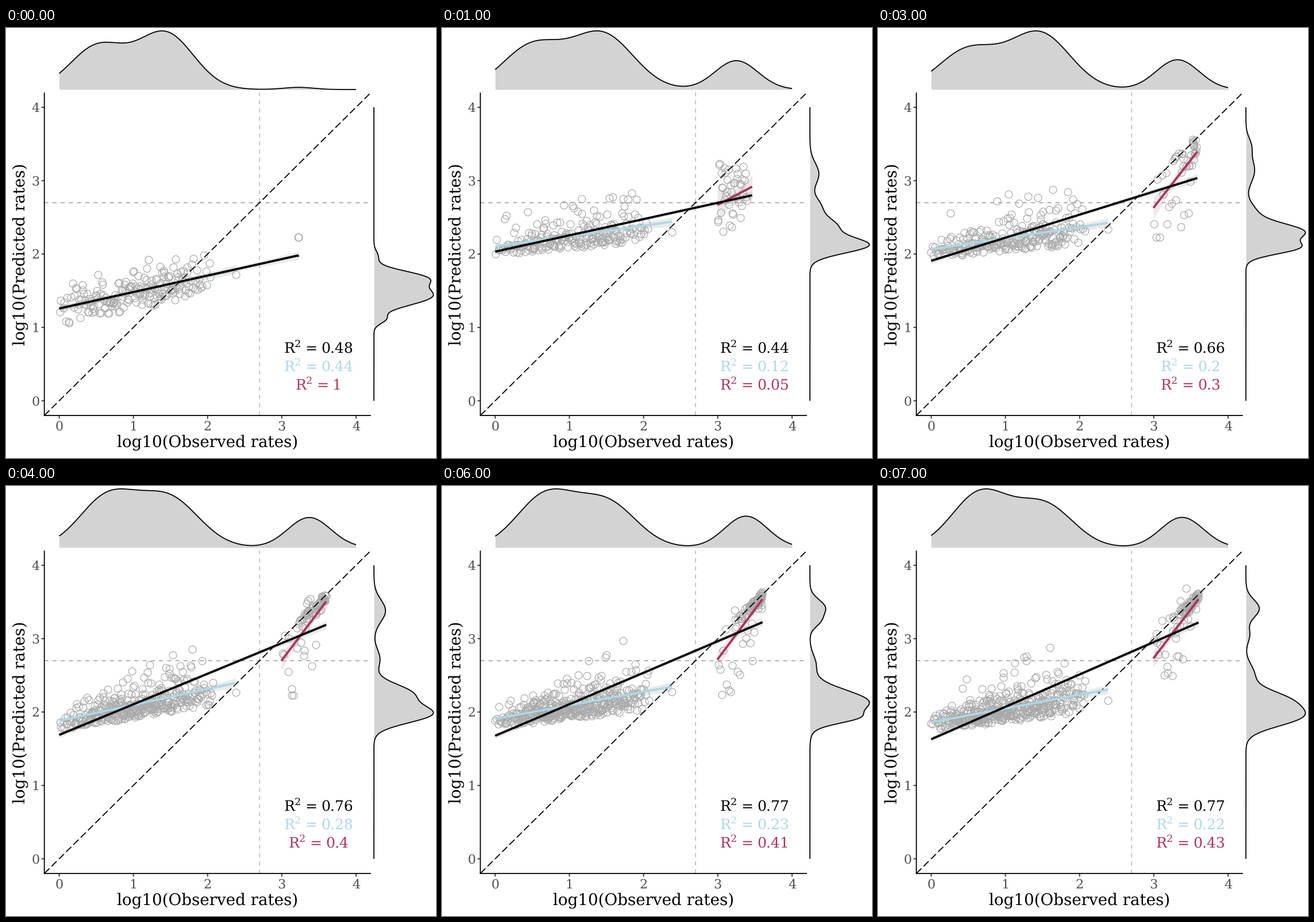
These frames come from a looping animation (748x748 px, 8 s). A matplotlib script:

```python
import numpy as np
import matplotlib.pyplot as plt
from matplotlib.animation import ArtistAnimation

SIZE, PT = 748, 0.72  # stage in pixels, points per pixel
GRAY, BLUE, RED = "#a9a9a9", "#add8e6", "#b03060"


def px(v):
    return 92.5 + 129.1 * v


def py(v):
    return 648.5 - 127.65 * v


LEFT, RIGHT, TOP, BOTTOM = px(-0.2), px(4.2), py(4.2), py(-0.2)
V = np.linspace(0, 4, 400)  # data values along both density panels

plt.rcParams["font.family"] = "DejaVu Serif"
plt.rcParams["text.hinting"] = "none"
fig = plt.figure(figsize=(SIZE / 100, SIZE / 100), dpi=100, facecolor="white")
ax = fig.add_axes([0, 0, 1, 1])
ax.set(xlim=(0, SIZE), ylim=(SIZE, 0))
ax.axis("off")


def line(xs, ys, color, width, z, **kw):
    return ax.plot(xs, ys, color=color, lw=width * PT, zorder=z, snap=False,
                   solid_capstyle="butt", **kw)[0]


def text(x, y, s, size, color="black", **kw):
    return ax.text(x, y, s, fontsize=size, color=color, zorder=9,
                   va="baseline", **kw)


def bumps(parts):
    """Sum of bell curves given as (centre, width, height)."""
    return sum(h * np.exp(-0.5 * ((V - c) / w) ** 2) for c, w, h in parts)


def left_cloud(rng, top, blue, n, shape, s0, s1):
    """x follows the first two bumps, y a skewed spread about the blue fit."""
    cdf = np.cumsum(bumps(top[:2]) * (V < 2.1))
    x = px(np.interp((np.arange(n) + rng.random(n)) / n, cdf / cdf[-1], V))
    x[-1] = blue[2]
    t = (x - px(0)) / 256
    tail = np.minimum(rng.gamma(shape, size=n), shape + 4.5 * shape ** 0.5)
    y = np.interp(x, blue[::2], blue[1::2])
    return np.c_[x, y + (s0 + (s1 - s0) * t) * (shape - tail)]


def right_cloud(rng, red, hug, gap, n, up, down):
    """Some points hug the diagonal, others scatter about the red fit."""
    x0, y0, x1, y1 = red
    end = (x1 - px(0)) / 129.1
    hx = 3.18 + (end - 3.18) * np.sqrt(rng.random(hug))
    hy = hx + 0.04 - gap * np.abs(rng.normal(size=hug))
    t = 0.85 * (np.arange(n) + rng.random(n)) / max(n, 1)
    y = y0 + (y1 - y0) * t + rng.uniform(-up, down, n)
    return np.vstack([np.c_[px(hx), py(hy)],
                      np.c_[x0 + (x1 - x0) * t, np.minimum(y, 364)]])


def state(top, side, end, black, blue, red, band, r2, left, right):
    """Densities, fits and points of one model."""
    rng = np.random.default_rng(left[0])
    black = (px(0), black[0], end, black[1])
    blue = (px(0), blue[0], px(2.38), blue[1])
    red = (red[0], red[1], end, red[2])
    pts = np.vstack([left_cloud(rng, top, blue, *left),
                     right_cloud(rng, red, *right)])
    top, side = bumps(top), bumps(side)
    return dict(top=top * 102 / top.max(), side=side * 103.5 / side.max(),
                fits=np.array([black, blue, red]), band=band, pts=pts, r2=r2)


def blend(a, b, r2):
    mid = {k: (a[k] + b[k]) / 2 for k in ("top", "side", "fits", "band")}
    return dict(mid, pts=np.vstack([a["pts"][::2], b["pts"][1::2]]), r2=r2)


first = state(
    [(.52, .37, 75), (1.43, .38, 98), (3.22, .2, 3.8)],
    [(1.11, .06, 17), (1.43, .13, 100), (1.68, .095, 78), (1.97, .07, 7)],
    509, (488, 395.5), (488, 420), (508, 396, 398), 0, ("0.48", "0.44", "1"),
    (205, 9, 5.2, 5.8), (0, 0, 2, 0, 0))
second = state(
    [(.5, .4, 75), (1.44, .42, 96), (3.25, .29, 50)],
    [(2.12, .107, 100), (2.38, .11, 43), (2.64, .12, 19), (3.09, .15, 15.5)],
    539.5, (389, 291), (380, 337), (479, 308, 276), 30, ("0.44", "0.12", "0.05"),
    (225, 2, 8, 16), (0, 0, 42, 70, 55))
third = state(
    [(.5, .4, 69), (1.46, .41, 98), (3.32, .29, 52)],
    [(2.08, .085, 80), (2.3, .11, 97), (2.55, .13, 18), (3.14, .17, 15),
     (3.48, .11, 8)],
    555.5, (405, 261), (385, 339), (479, 313, 215), 20, ("0.66", "0.2", "0.3"),
    (250, 2, 8, 16), (24, .16, 20, 45, 100))
fourth = state(
    [(.65, .38, 87), (1.47, .41, 87), (3.37, .29, 53)],
    [(1.97, .12, 100), (2.25, .13, 67), (2.72, .13, 11), (3.38, .15, 21)],
    557, (433, 241.5), (408.5, 342.5), (479, 304, 201), 16, ("0.76", "0.28", "0.4"),
    (350, 2, 8, 16), (48, .09, 22, 50, 95))
fifth = state(
    [(.68, .39, 90), (1.5, .4, 78), (3.38, .29, 55)],
    [(1.91, .07, 38), (2.13, .17, 101), (2.65, .13, 10), (3.23, .08, 13),
     (3.42, .11, 26)],
    557.5, (434.5, 237), (405, 349), (479, 302, 197), 16, ("0.77", "0.23", "0.41"),
    (400, 2, 8, 16), (60, .08, 22, 50, 95))
sixth = state(
    [(.66, .38, 95), (1.52, .39, 75), (3.38, .29, 53)],
    [(1.93, .13, 86), (2.17, .13, 65), (2.52, .13, 14), (3.05, .1, 6.5),
     (3.41, .12, 23)],
    557.5, (440.5, 237.5), (411, 354), (479, 300, 197), 16, ("0.77", "0.22", "0.43"),
    (410, 2, 8, 16), (55, .08, 24, 50, 95))

states = [first, second, blend(second, third, ("0.55", "0.16", "0.18")),
          third, fourth, blend(fourth, fifth, ("0.76", "0.25", "0.4")),
          fifth, sixth]


def draw_axes():
    line([LEFT, LEFT], [TOP, BOTTOM + 0.9], "black", 1.8, 8)
    line([LEFT - 0.9, RIGHT], [BOTTOM, BOTTOM], "black", 1.8, 8)
    for v in range(5):
        line([px(v)] * 2, [BOTTOM, BOTTOM + 5.5], "#333333", 1.8, 7)
        line([LEFT - 5, LEFT], [py(v)] * 2, "#333333", 1.8, 7)
        text(px(v), 699.5, str(v), 16, "#4d4d4d", ha="center")
        text(58.5, py(v) + 8, str(v), 16, "#4d4d4d", ha="right")
    text((LEFT + RIGHT) / 2, 729, "log10(Observed rates)", 20, ha="center")
    text(33, (TOP + BOTTOM) / 2, "log10(Predicted rates)", 20, ha="center",
         rotation=90, rotation_mode="anchor")
    line([LEFT, RIGHT], [py(2.7)] * 2, GRAY, 1.78, 4, ls=(0, (4, 4)))
    line([px(2.7)] * 2, [BOTTOM, TOP], "#bebebe", 1.78, 4, ls=(0, (4, 4)))
    line([LEFT, RIGHT], [BOTTOM, TOP], "black", 1.78, 4, ls=(0, (7, 3)))


def draw_r2(y, value, color):
    width = 64.7 + 15.9 * len(value) - (7.95 if "." in value else 0)
    x = 543.5 - width / 2
    return [text(x, y, "R", 18, color),
            text(x + 18.8, y - 10, "2", 12.6, color),
            text(x + 36.8, y, "=", 18, color),
            text(x + 64.7, y, value, 18, color)]


def draw_fit(fit, band, color, z):
    t = np.linspace(0, 1, 40)
    x = fit[0] + (fit[2] - fit[0]) * t
    y = fit[1] + (fit[3] - fit[1]) * t
    half = np.polyval(np.polyfit([0, 0.5, 1], band, 2), t)
    return [ax.fill_between(x, y - half, y + half, color="#999999",
                            alpha=0.2, lw=0, zorder=5),
            line(x, y, color, 3.8, z)]


def draw_state(s):
    top, side = 107 - s["top"], 640 + s["side"]
    art = [ax.fill_between(px(V), 107, top, color="#d3d3d3", lw=0, zorder=1),
           line(px(V), top, "black", 1.8, 2),
           ax.fill_betweenx(py(V), 640, side, color="#d3d3d3", lw=0, zorder=1),
           line(side, py(V), "black", 1.8, 2)]
    art += ax.plot(*s["pts"].T, "o", ms=12.8 * PT, mfc="none", mec=GRAY,
                   mew=1.2 * PT, zorder=3, snap=False)
    colors = ("black", BLUE, RED)
    w = s["band"]
    bands = ((5, 2.5, 7), (5, 3, 8), (w, 0.4 * w, 0.7 * w))
    for fit, band, color, z in zip(s["fits"], bands, colors, (7, 6, 6)):
        art += draw_fit(fit, band, color, z)
    for row, (value, color) in enumerate(zip(s["r2"], colors)):
        art += draw_r2(py(0.75 - 0.25 * row) + 12, value, color)
    return art


draw_axes()
anim = ArtistAnimation(fig, [draw_state(s) for s in states], interval=1000,
                       repeat=True, repeat_delay=0, blit=False)
plt.show()
```
